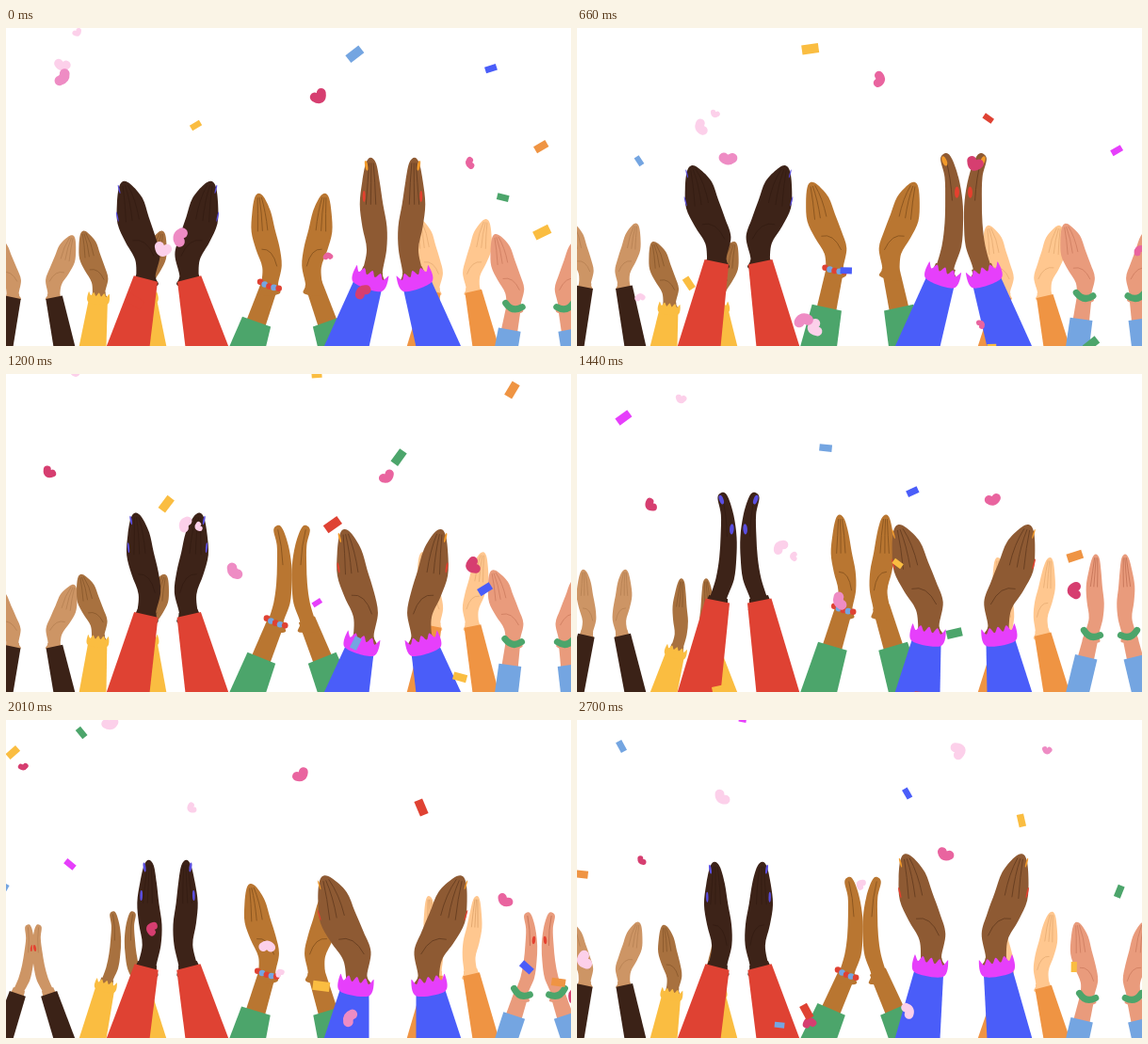
Recreate the animation shown at these times as an HTML page with a canvas. Size 600x338 px, loop 2730 ms.

```html
<!DOCTYPE html>
<html lang="en">
<head>
<meta charset="utf-8">
<title>Applause</title>
<style>
html, body { margin: 0; width: 100%; height: 100%; overflow: hidden; background: #fff; }
canvas { display: block; width: 100vw; height: 100vh; }
</style>
</head>
<body>
<canvas id="stage" width="600" height="338"></canvas>
<script>
const ctx = document.getElementById('stage').getContext('2d');
const LOOP = 2730, POSES = 33, BOB = 11, FLOOR = 339;
const RED = '#df4233', YELLOW = '#fabd41', GREEN = '#4ca56b', BLUE = '#4a5df9', SKY = '#74a5e1',
  ORANGE = '#ef9443', MAGENTA = '#e63ffb';
const STRIP_COLORS = [RED, YELLOW, GREEN, ORANGE, YELLOW, BLUE, SKY, MAGENTA];
const PETAL_COLORS = ['#fcd0ea', '#e9649f', '#d63e70', '#fcd0ea', '#ee8cc4'];

// Hand edges across the hand, at each station from wrist to fingertip.
const STATIONS = [0, .2, .4, .6, .8, .96];
const PALM = { left: [-.1, -.07, -.13, -.17, -.13, -.07], right: [.1, .2, .19, .17, .15, .06] };
const SIDE = { left: [-.085, -.045, -.08, -.1, -.08, -.05], right: [.09, .12, .125, .09, .06, .035] };
const SHUT = { left: [-.08, -.03, -.01, -.01, -.02, -.06], right: [.08, .14, .15, .14, .1, .04] };

// beat: start of opening, widest, shut again. tip, wrist: distance from the axis when [shut, open].
// bob: middle height, swing, lowest pose.
const people = [
  { axis: 29, claps: 9, beat: [18, 28, 52], tip: [4, 43], wrist: [16, 22], bob: [281, 8, 2], reach: 71,
    skin: '#cd9565', line: '#b27d50', sleeve: '#3b2217', cuff: 9, foot: [33, 11.5], fore: 2, nails: [null, '#e5402f'] },
  { axis: 124, claps: 5, beat: [21, 37, 53], tip: [9, 44], wrist: [17, 26], bob: [286, 8, 7.5], reach: 74,
    skin: '#a8713f', line: '#835429', sleeve: YELLOW, cuff: 10, foot: [32, 14.5], fore: 6, frill: YELLOW, frillW: 11 },
  { axis: 474.5, claps: 9, beat: [17, 45, 50], tip: [24, 38], wrist: [19, 22], bob: [275, 9, 8.8], reach: 81,
    skin: '#ffc78f', line: '#e3a86f', sleeve: ORANGE, cuff: 9, foot: [35, 14], fore: 2 },
  { axis: 566.5, claps: 5, beat: [21, 37, 53], tip: [11, 49], wrist: [19, 28], bob: [286, 10, 0], reach: 85,
    skin: '#e99b7c', line: '#c9785b', sleeve: SKY, cuff: 12, foot: [35, 12.5], fore: 25, band: true, nails: [null, '#e5402f'] },
  { axis: 303.5, claps: 9, beat: [28, 45, 55.5], tip: [13, 61], wrist: [17, 32], bob: [262, 12, .5], reach: 102,
    skin: '#b97631', line: '#8d5720', sleeve: GREEN, cuff: 16, foot: [47, 19.5], fore: 41, beads: true },
  { axis: 171.5, claps: 9, beat: [21, 38, 52], tip: [15, 49], wrist: [22, 23], bob: [253, 13, .5], reach: 113,
    skin: '#3d2318', line: '#351d13', sleeve: RED, cuff: 13, foot: [42, 23], fore: 1, nails: ['#5a4ee0', '#5a4ee0'] },
  { axis: 410.5, claps: 9, beat: [12, 17, 34], tip: [17, 72], wrist: [20, 38], bob: [267, 14, 3.7], reach: 122,
    skin: '#8e5a33', line: '#6a4022', sleeve: BLUE, cuff: 15.5, foot: [49, 24], fore: 14, frill: MAGENTA, frillW: 18,
    nails: ['#f29a2a', '#e5402f'] }
];

const mix = (a, b, t) => a + (b - a) * t;
const morph = (a, b, c, s) => s < 1 ? mix(a, b, s) : mix(b, c, s - 1);

function openness([start, peak, end], k) {
  if (k < start) k += POSES;
  if (k >= end) return 0;
  return Math.sin(Math.PI / 2 * (k < peak ? (k - start) / (peak - start) : (end - k) / (end - peak)));
}

// Pose of the left arm; the right arm mirrors it.
function poseAt(p, step) {
  const open = openness(p.beat, step * p.claps % POSES), [mid, swing, low] = p.bob;
  const wy = mid + swing * Math.cos((step - low) / BOB * 2 * Math.PI);
  return {
    tx: p.axis - mix(...p.tip, open), ty: wy - p.reach * (1 - .11 * open),
    wx: p.axis - mix(...p.wrist, open), wy,
    bx: p.axis - p.foot[0],
    s: open < .04 ? 2 : 1 - open
  };
}

function fillPoly(color, pts) {
  ctx.fillStyle = color;
  ctx.beginPath();
  pts.forEach(p => ctx.lineTo(...p));
  ctx.fill();
}

function fillSmooth(color, pts) {
  const n = pts.length, at = i => pts[(i + n) % n];
  ctx.fillStyle = color;
  ctx.beginPath();
  ctx.moveTo(...pts[0]);
  for (let i = 0; i < n; i++) {
    const [a, b, c, d] = [at(i - 1), at(i), at(i + 1), at(i + 2)];
    ctx.bezierCurveTo(b[0] + (c[0] - a[0]) / 6, b[1] + (c[1] - a[1]) / 6,
      c[0] - (d[0] - b[0]) / 6, c[1] - (d[1] - b[1]) / 6, ...c);
  }
  ctx.fill();
}

function strokeCurve(color, width, a, ctrl, b) {
  ctx.strokeStyle = color;
  ctx.lineWidth = width;
  ctx.lineCap = 'round';
  ctx.beginPath();
  ctx.moveTo(...a);
  ctx.quadraticCurveTo(...ctrl, ...b);
  ctx.stroke();
}

function oval(color, x, y, rx, ry, turn = 0) {
  ctx.fillStyle = color;
  ctx.beginPath();
  ctx.ellipse(x, y, rx, ry, turn, 0, Math.PI * 2);
  ctx.fill();
}

function drawHand(p, { tx, ty, wx, wy, s }) {
  const len = Math.hypot(tx - wx, ty - wy), ux = (tx - wx) / len, uy = (ty - wy) / len;
  const local = (u, v) => [wx + (ux * u - uy * v) * len, wy + (uy * u + ux * v) * len];
  const edge = side => STATIONS.map((u, i) => [u, morph(PALM[side][i], SIDE[side][i], SHUT[side][i], s)]);
  const left = edge('left'), right = edge('right');
  const across = (i, f) => local(STATIONS[i], mix(left[i][1], right[i][1], f));

  const outline = [[-.1, -.1], ...left, [1.01, -.01], ...right.reverse(), [-.1, .1]];
  right.reverse();
  fillSmooth(p.skin, outline.map(q => local(...q)));

  const lineWidth = len > 80 ? 1 : .7;
  for (const f of s > 1.5 ? [.45] : [.32, .52, .74])
    strokeCurve(p.line, lineWidth, across(5, f), across(4, f), across(3, f - .05));
  if (s < .8) strokeCurve(p.line, lineWidth, across(2, .25), across(2, .7), across(1, .75));

  if (!p.nails) return;
  const [tip, thumb] = p.nails, turn = Math.atan2(ux, -uy), size = len * mix(.006, .02, s / 2);
  if (tip) oval(tip, ...local(.94, morph(-.075, -.045, -.025, s)), size, len * .045, turn - .2 * s);
  if (tip || s > 1.5) oval(thumb, ...local(.67, morph(-.16, -.06, .09, s)), size, len * .05, turn);
}

function drawArm(p, pose, isLeft) {
  const { wx, wy, bx } = pose, foot = p.foot[1];
  const down = Math.hypot(bx - wx, FLOOR - wy), dx = (bx - wx) / down, dy = (FLOOR - wy) / down;
  const arm = (along, side) => [wx + dx * along + dy * side, wy + dy * along - dx * side];
  const half = p.reach * .09;

  fillPoly(p.skin, [arm(-3, -half), arm(p.fore + 4, -half * 1.15), arm(p.fore + 4, half * 1.15), arm(-3, half)]);
  drawHand(p, pose);
  fillPoly(p.sleeve, [arm(p.fore, -p.cuff), arm(p.fore, p.cuff), [bx + foot, FLOOR], [bx - foot, FLOOR]]);

  if (p.frill) {
    const w = p.frillW, top = [];
    for (let i = 0; i <= 8; i++) top.push(arm(i % 2 ? w * .22 : -w * .1, w * (i / 4 - 1)));
    fillSmooth(p.frill, [...top, arm(w * .9, p.cuff), arm(w * .9, -p.cuff)]);
  }
  if (p.band) strokeCurve(GREEN, 7, arm(-2, -9), arm(7, 0), arm(-1, 9));
  if (p.beads && isLeft)
    for (let i = -2; i <= 2; i++) oval(i % 2 ? SKY : RED, ...arm(1 - i * i * .3, i * 5.2), 3.3, 3.3);
}

function drawPerson(p, step) {
  const pose = poseAt(p, step);
  drawArm(p, pose, true);
  ctx.save();
  ctx.translate(2 * p.axis, 0);
  ctx.scale(-1, 1);
  drawArm(p, pose, false);
  ctx.restore();
}

// Confetti: each piece enters above the stage at its own time and keeps its speed.
let seed = 41;
const rand = (lo, hi) => {
  seed = seed * 16807 % 2147483647;
  return mix(lo, hi, seed / 2147483647);
};
const shower = (count, lead, make) => Array.from({ length: count }, (_, i) => ({
  born: mix(-lead, LOOP / 1000, (i + rand(0, 1)) / count), tilt: rand(0, Math.PI), ...make(i)
}));

const petals = shower(22, 2.8, i => ({
  x: rand(-200, 520), vx: rand(60, 160), vy: rand(95, 145), spin: 1.5,
  color: PETAL_COLORS[i % PETAL_COLORS.length], size: rand(5, 11), bend: rand(.4, 1.2), draw: petal
}));
const strips = shower(56, .4, i => ({
  x: rand(0, 600), vx: rand(-90, 110), vy: rand(650, 900), spin: 3,
  color: STRIP_COLORS[i % STRIP_COLORS.length], size: rand(10, 18), draw: strip
}));

function strip({ color, size }) {
  ctx.fillStyle = color;
  ctx.fillRect(-size / 2, -size * .28, size, size * .56);
}

function petal({ color, size, bend }) {
  const end = size * bend * .3;
  strokeCurve(color, size * 1.05, [-size * .45, end], [0, -size * bend * .6], [size * .45, end]);
}

function drawPiece(piece, now) {
  const age = now - piece.born, y = piece.vy * age - 15;
  if (y < -15 || y > 355) return;
  ctx.save();
  ctx.translate(piece.x + piece.vx * age, y);
  ctx.rotate(piece.tilt + age * piece.spin);
  piece.draw(piece);
  ctx.restore();
}

function draw(ms) {
  const t = ms % LOOP, step = Math.floor(t / LOOP * POSES + .2) % POSES;
  ctx.fillStyle = '#fff';
  ctx.fillRect(0, 0, 600, 338);
  people.forEach(p => drawPerson(p, step));
  [...petals, ...strips].forEach(piece => drawPiece(piece, t / 1000));
}

const start = performance.now();
function tick() {
  draw(performance.now() - start);
  requestAnimationFrame(tick);
}
tick();
</script>
</body>
</html>
```
